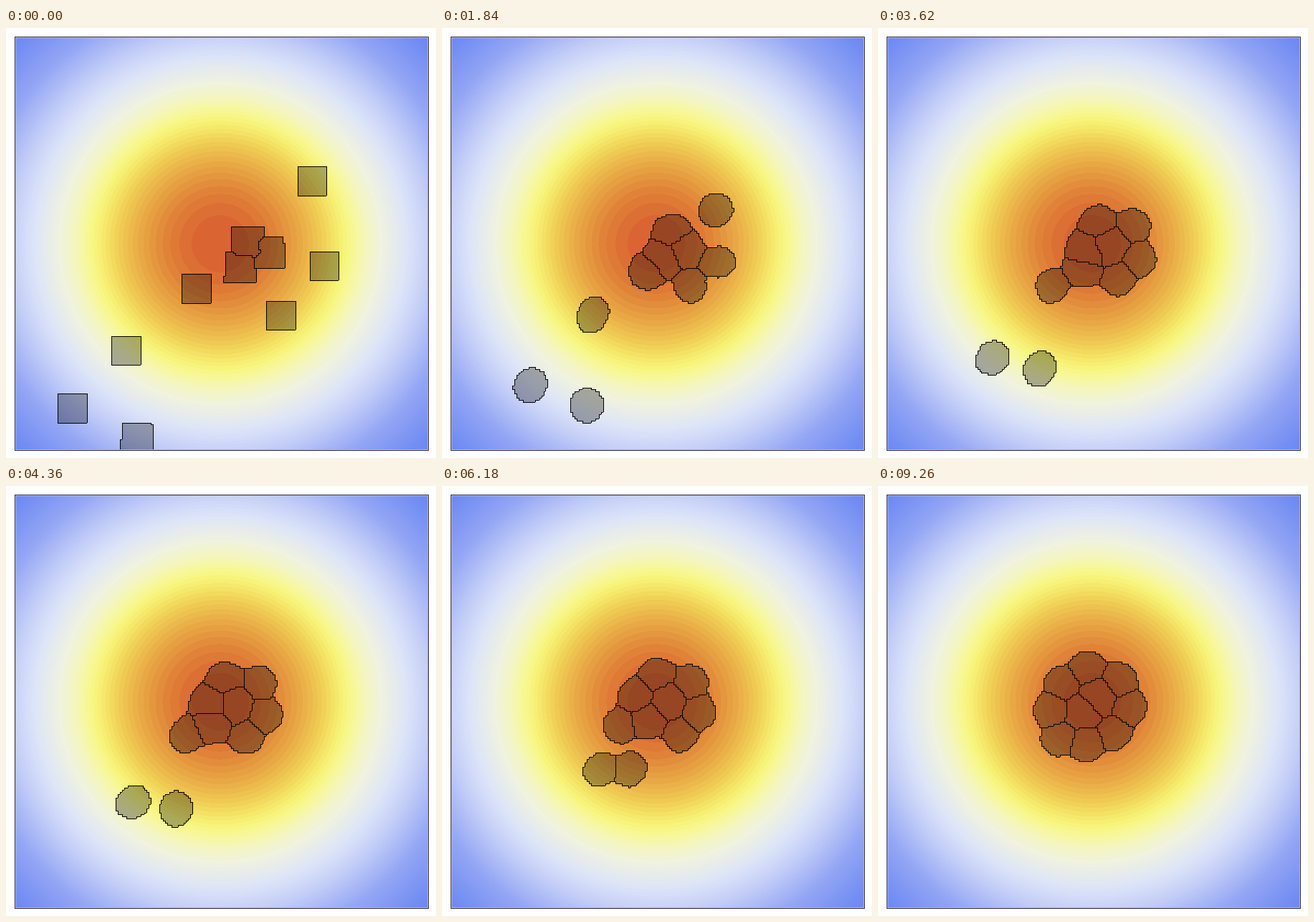
A matplotlib script that plays this animation: 600x600 px, repeating every 9280 ms.

```python
import numpy as np
import matplotlib.pyplot as plt
from matplotlib.animation import FuncAnimation
from matplotlib.patches import Rectangle

STAGE, LEFT, SIZE, N = 600, 12, 576, 200
UNIT = SIZE / N
DPI = 100
TICK, LOOP = 20, 9280
STEPS = 200
SHADE = 0.69
CENTRE = np.array([299.0, 301.0])

# Per cell: start, place where it meets the cluster, final place.
CELLS = [
    [(428, 213), (357, 275), (335, 272)],
    [(445, 331), (366, 324), (350, 309)],
    [(384, 400), (336, 350), (329, 345)],
    [(168, 450), (255, 344), (241, 312)],
    [(93, 530), (234, 380), (252, 352)],
    [(183, 570), (268, 381), (292, 360)],
    [(266, 363), (288, 337), (285, 315)],
    [(338, 299), (307, 276), (293, 253)],
    [(365, 312), (318, 304), (308, 295)],
    [(326, 331), (278, 300), (256, 276)],
]

rng = np.random.default_rng(4)
site = np.arange(N, dtype=np.float32) + 0.5
gx, gy = np.meshgrid(site, site)


def speed(p):
    """Pixels per step, following the slope of a bell-shaped signal."""
    u = np.hypot(*(p - CENTRE)) / 170
    return max(0.5, 1.65 * u * np.exp((1 - u * u) / 2))


def travel(start, join, final):
    """Climb the signal to the cluster, then drift evenly; lattice units."""
    p = LEFT + UNIT * (np.round((np.array(start) - LEFT) / UNIT) + (0.1, 0))
    path = [p]
    while len(path) < STEPS - 1:
        gap = join - p
        dist, v = np.hypot(*gap), speed(p)
        if dist < v:
            break
        p = p + gap * v / dist
        path.append(p)
    drift = np.linspace(p, final, STEPS - len(path) + 1)[1:]
    return (np.vstack([path, drift]) - LEFT) / UNIT


def blur(a, passes):
    for _ in range(passes):
        for axis in (-1, -2):
            a = (a + np.roll(a, 1, axis) + np.roll(a, -1, axis)) / np.float32(3)
    return a


def rough_field():
    fine, broad = (blur(rng.normal(size=(len(CELLS), N, N)).astype(np.float32), n)
                   for n in (2, 16))
    return 3.5 * fine / fine.std() + 4.5 * broad / broad.std()


TRACKS = np.array([travel(*c) for c in CELLS], np.float32)
SPEEDS = np.gradient(TRACKS, axis=1)


def distances(k, square):
    """Squared distance to each centre: square at first, then round and
    stretched along the heading."""
    cx, cy = TRACKS[:, k].T[:, :, None, None]
    vx, vy = SPEEDS[:, k].T[:, :, None, None]
    dx, dy = gx - cx, gy - cy
    box = np.maximum(np.abs(dx), np.abs(dy)) - np.float32(0.03) * dy
    r2 = dx * dx + dy * dy
    along = (dx * vx + dy * vy) ** 2 - (vx * vx + vy * vy) * r2 / 2
    return square * box ** 2 + (1 - square) * (r2 - np.float32(0.7) * along)


def simulate():
    """Partition the lattice per step, tuning weights so areas stay equal."""
    states = []
    fields = rough_field(), rough_field()
    weight = np.full(len(CELLS), 51, np.float32)
    for k in range(STEPS):
        square = np.float32(np.exp(-k / 5))
        loose = 1 - square
        cost = distances(k, square)
        for wave, field in zip((np.cos(k / 5), np.sin(k / 5)), fields):
            cost += np.float32(loose * wave) * field
        for _ in range(3 if k else 40):
            rest = cost - weight[:, None, None]
            cover = (rest.min(0) < 0).astype(np.float32)
            # Blurring the cover closes the notches between neighbours.
            inside = square * cover + loose * blur(cover, 10) > 0.5
            lab = np.where(inside, rest.argmin(0), -1).astype(np.int8)
            count = np.bincount(lab.ravel() + 1, minlength=len(CELLS) + 1)[1:]
            weight += (0.25 * (200 + 12 * loose - count)).astype(np.float32)
        states.append(lab)
    return states


def level(r):
    return np.exp(-np.square(r) / (2 * 300.0 ** 2))


def background():
    stops = [
        (0, (217, 97, 50)), (60, (222, 119, 54)), (100, (230, 157, 65)),
        (140, (240, 204, 84)), (160, (245, 230, 104)), (175, (248, 246, 126)),
        (190, (247, 248, 160)), (205, (244, 246, 194)), (225, (240, 243, 224)),
        (260, (221, 229, 248)), (287, (201, 211, 248)), (340, (148, 167, 245)),
        (400, (110, 138, 243)),
    ][::-1]
    px = np.arange(SIZE) + 0.5 + LEFT
    g = level(np.hypot(px[None, :] - CENTRE[0], px[:, None] - CENTRE[1]))
    g = (np.floor(g * 113) + 0.5) / 113
    xs = [level(r) for r, _ in stops]
    return np.dstack([np.interp(g, xs, [c[i] for _, c in stops]) for i in range(3)])


BACK = background()
LIGHT, DARK = BACK.astype(np.uint8), (BACK * SHADE).astype(np.uint8)
STATES = simulate()
PIX = ((np.arange(SIZE) + 0.5) / UNIT).astype(int)


def paint(k):
    lab = STATES[k][np.ix_(PIX, PIX)]
    img = np.where((lab >= 0)[..., None], DARK, LIGHT)
    edge = (lab != np.roll(lab, 1, 0)) | (lab != np.roll(lab, 1, 1))
    img[edge] = 0
    return img


def step_at(ms):
    # Steps come in threes, held 20, 100 and 20 ms.
    turn, rest = divmod(ms, 140)
    return 3 * turn + (rest >= 20) + (rest >= 120)


fig = plt.figure(figsize=(STAGE / DPI, STAGE / DPI), dpi=DPI, facecolor="white")
ax = fig.add_axes([0, 0, 1, 1])
ax.axis("off")
far = LEFT + SIZE
view = ax.imshow(paint(0), extent=(LEFT, far, far, LEFT), interpolation="nearest",
                 aspect="auto")
ax.set(xlim=(0, STAGE), ylim=(STAGE, 0))
for inset, color in ((0.5, "#c4b4e8"), (-0.5, "#303030")):
    ax.add_patch(Rectangle((LEFT + inset,) * 2, SIZE - 2 * inset, SIZE - 2 * inset,
                           fill=False, ec=color, lw=72 / DPI))


def update(i):
    view.set_data(paint(step_at(i * TICK)))
    return [view]


anim = FuncAnimation(fig, update, frames=LOOP // TICK, interval=TICK, repeat=True,
                     repeat_delay=0)
plt.show()
```
